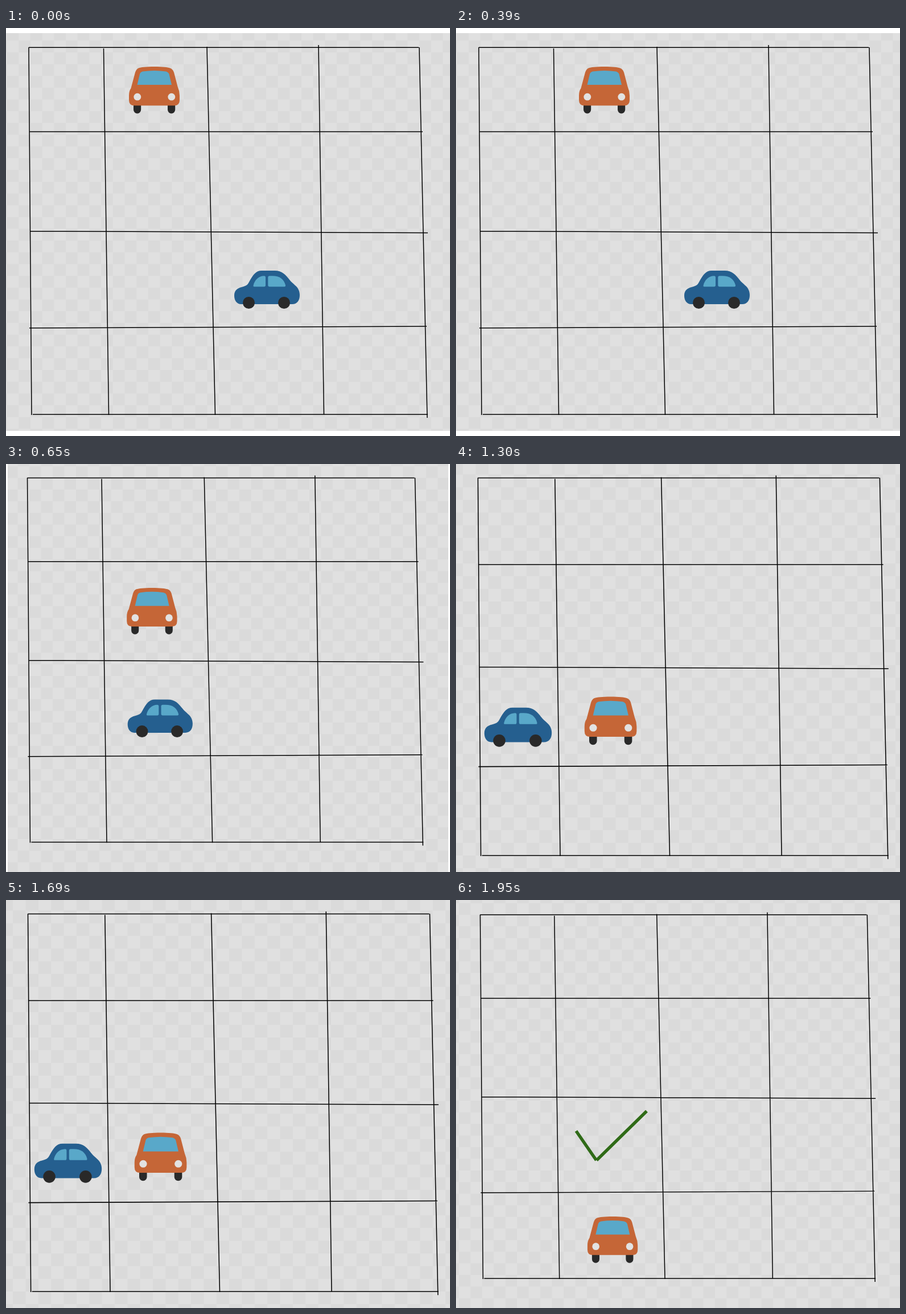
Write an HTML page with a canvas that moves like this. It is 780 px wide and 718 px high and loops after 2600 ms.

```html
<!DOCTYPE html>
<html>
<head>
<meta charset="utf-8">
<title>Cars crossing a grid</title>
<style>
html, body { margin: 0; height: 100%; overflow: hidden; background: #fff; }
canvas { display: block; }
</style>
</head>
<body>
<canvas width="780" height="718"></canvas>
<script>
const ctx = document.querySelector('canvas').getContext('2d');
const STEP = 650;

// area: visible backdrop; tile: checker origin and size; view: scale and offset of the board
const scenes = [
  { area: [0, 9, 780, 700], tile: [1.5, 1.5, 20.7], view: [1, 0, 0], front: [0, 0], side: [0, 0] },
  { area: [3, 0, 774, 718], tile: [0, 4, 20.5], view: [0.9927, -2.2, -9.45], front: [0, 161], side: [-183.5, 0] },
  { area: [0, 0, 780, 718], tile: [12.2, 18.5, 22.35], view: [1.029, -2.66, -10.7], front: [6, 340.4], side: [-350, 0] },
  { area: [0, 0, 780, 718], tile: [5, 5.5, 20.45], view: [0.991, 2.85, -7.9], front: [14.2, 502], tick: true }
];

const gridLines = new Path2D(`M40 34L45 681M171.5 36L180.5 681M353 33L367.5 681M549 30L558.5 680M726 34L740 686
  M40 34.3H725M41 182.5H732M42 357.5L741 360.5M41 528L739 525M47 680H741`);

function fill(color, path) {
  ctx.fillStyle = color;
  ctx.fill(new Path2D(path));
}

function disc(color, x, y, r) {
  ctx.fillStyle = color;
  ctx.beginPath();
  ctx.arc(x, y, r, 0, 7);
  ctx.fill();
}

function drawBackdrop([x, y, w, h], [left, top, size]) {
  ctx.save();
  ctx.beginPath();
  ctx.rect(x, y, w, h);
  ctx.clip();
  ctx.fillStyle = '#e0e0e0';
  ctx.fillRect(x, y, w, h);
  ctx.fillStyle = '#dadada';
  for (let row = -1; row < 36; row++)
    for (let col = -1; col < 39; col++)
      if ((row + col) % 2 === 0) ctx.fillRect(left + col * size, top + row * size, size, size);
  ctx.restore();
}

function drawFrontCar() {
  for (const x of [224, 284])
    fill('#292929', `M${x} 132h13.2v11.8a6.6 6.6 0 0 1 -13.2 0z`);
  fill('#c56637', `M260.5 68C275 68 284 69 288 70.5Q293 72 295 78L301.5 103Q305 111 305 119V127
    Q305 136.5 295.5 136.5H225.5Q216 136.5 216 127V119Q216 111 219.5 106L227 78Q229 72 233 70.5C237 69 246 68 260.5 68Z`);
  fill('#59a8c9', 'M230.5 100L235 81Q236 77.5 240 76.5Q260.5 73.5 281 76.5Q285 77.5 286.5 81L291 100Z');
  for (const x of [230.8, 290.8]) disc('#e2e2e2', x, 121.2, 6.4);
}

function drawSideCar() {
  fill('#255f8f', `M413 486C405 486 401 479 401 471C401 462 406 458 414 456C421 454 424 453 427 447
    C434 434 439 427 449 427H472C485 427 491 434 498 443C501 447 504 449 508 453
    C513 457 516 463 516 470C516 480 511 486 503 486Z`);
  fill('#59a8c9', 'M436 455.3Q434 455.3 434.5 453C437 443 444 436.5 453.5 436.3Q456 436.3 456 439V452.5Q456 455.3 453.5 455.3Z');
  fill('#59a8c9', 'M463 436.3H468C481 436.3 488 442 491 452.5Q491.5 455.3 489 455.3H463Q460.3 455.3 460.3 452.5V439Q460.3 436.3 463 436.3Z');
  for (const x of [426.5, 488.5]) disc('#292929', x, 483.5, 10.5);
}

function place(draw, [dx, dy]) {
  ctx.save();
  ctx.translate(dx, dy);
  draw();
  ctx.restore();
}

function drawScene({ area, tile, view: [scale, x, y], front, side, tick }) {
  ctx.setTransform(1, 0, 0, 1, 0, 0);
  ctx.fillStyle = '#fff';
  ctx.fillRect(0, 0, 780, 718);
  drawBackdrop(area, tile);
  ctx.setTransform(scale, 0, 0, scale, x, y);
  ctx.strokeStyle = '#000';
  ctx.lineWidth = 1.5;
  ctx.stroke(gridLines);
  place(drawFrontCar, front);
  if (side) place(drawSideCar, side);
  if (tick) {
    ctx.setTransform(1, 0, 0, 1, 0, 0);
    ctx.strokeStyle = '#2f6b17';
    ctx.lineWidth = 5.5;
    ctx.stroke(new Path2D('M211 406.5L246.5 458M247 458L335 371.5'));
  }
}

function frame() {
  drawScene(scenes[Math.floor(performance.now() / STEP) % scenes.length]);
  requestAnimationFrame(frame);
}
frame();
</script>
</body>
</html>
```
